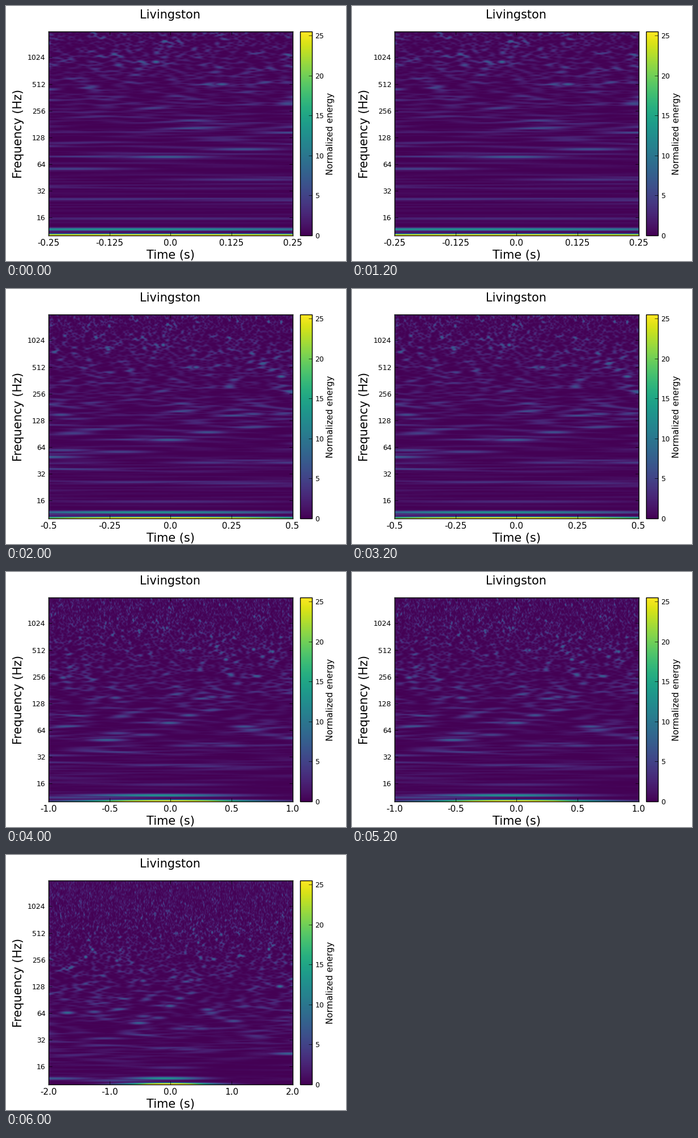
A matplotlib script for the animation above (8000 ms loop, 600x450 px).

```python
import numpy as np
import matplotlib.pyplot as plt
from matplotlib.animation import FuncAnimation

plt.rcParams.update({
    "font.family": "DejaVu Sans",
    "axes.linewidth": 1.0,
    "xtick.direction": "in", "ytick.direction": "in",
    "xtick.top": True, "ytick.right": True,
    "xtick.major.size": 4, "ytick.major.size": 4,
    "xtick.major.width": 0.5, "ytick.major.width": 0.5,
    "xtick.major.pad": 4, "ytick.major.pad": 4,
})

W, H, DPI = 600, 450, 100
F_MIN, F_MAX, ROWS = 10, 2000, 360
SPAN, RATE, Q = 8, 1024, 55      # seconds of noise, samples per second, quality
CYCLES = 5                       # burst length in periods of its own frequency
E_MAX = 25.5
HALF_WIDTHS = (0.25, 0.5, 1.0, 2.0)

# time (s), frequency (Hz), peak energy
BURSTS = [
    (-0.03, 10.05, 32), (-0.10, 11.75, 13.5), (-1.95, 11.7, 7), (-0.85, 11.1, 5),
    (0, 15.5, 3.2), (0.28, 25, 3.6), (0.15, 42.7, 4), (0.5, 42.7, 4.5),
    (-0.01, 77, 7.5), (0.15, 94, 6.5), (-0.21, 56.5, 5), (-0.03, 908, 9),
    (0.105, 508, 7.5), (-0.52, 49.4, 8), (0.453, 400, 8.5), (-0.45, 148, 6),
    (0.337, 151, 5.5), (-0.44, 59, 5), (-0.255, 810, 8), (0.605, 70, 6.5),
    (-0.88, 250, 7), (0.835, 490, 9), (0.68, 520, 9), (-1.69, 64.5, 9),
    (-1.25, 66, 6), (1.79, 128, 10), (1.96, 22.3, 8), (1.61, 336, 11),
    (-1.28, 333, 10), (-1.39, 275, 10), (1.03, 52, 6),
]

octave_lo, octave_hi = np.log2([F_MIN, F_MAX])
octave_step = (octave_hi - octave_lo) / ROWS
octaves = octave_lo + (np.arange(ROWS) + 0.5) * octave_step


def q_transform_noise(seed=11):
    """Normalized energy of white noise seen through constant-Q windows."""
    rng = np.random.default_rng(seed)
    n_bins = int(F_MAX * 1.1 * SPAN)
    spectrum = rng.normal(size=n_bins) + 1j * rng.normal(size=n_bins)
    energy = np.empty((ROWS, SPAN * RATE))
    for row, freq in enumerate(2 ** octaves):
        half = freq * np.sqrt(11) / Q
        bins = np.arange(int((freq - half) * SPAN) + 1, int((freq + half) * SPAN) + 1)
        window = (1 - ((bins / SPAN - freq) / half) ** 2) ** 2
        band = np.fft.ifft(spectrum[bins] * window, SPAN * RATE)
        power = np.abs(band) ** 2
        energy[row] = power / power.mean()
    start = SPAN * RATE // 2 - 2 * RATE
    return energy[:, start:start + 4 * RATE]


def make_energy():
    times = -2 + (np.arange(4 * RATE) + 0.5) / RATE
    level = np.interp(octaves, np.log2([10, 14, 18, 200]), [0.15, 0.3, 0.7, 1])
    energy = np.minimum(q_transform_noise(), 7) * level[:, None]
    for t, freq, peak in BURSTS:
        pulse = np.exp(-0.5 * ((times - t) * freq / CYCLES) ** 2)
        line = np.exp(-0.5 * ((octaves - np.log2(freq)) / (1.8 * octave_step)) ** 2)
        energy = np.maximum(energy, peak * np.outer(line, pulse))
    return energy


def pixel_axes(left, top, right, bottom):
    return fig.add_axes([left / W, 1 - bottom / H, (right - left) / W, (bottom - top) / H])


def label(x, y, text, size, **kw):
    fig.text(x / W, 1 - y / H, text, size=size, ha="center", va="baseline",
             rotation_mode="anchor", **kw)


fig = plt.figure(figsize=(W / DPI, H / DPI), dpi=DPI, facecolor="white")
ax = pixel_axes(75, 45, 505.5, 405)
image = ax.imshow(make_energy(), origin="lower", aspect="auto", cmap="viridis",
                  vmin=0, vmax=E_MAX, interpolation="bilinear",
                  extent=(-2, 2, octave_lo, octave_hi))
ax.set_yticks(range(4, 11), [str(2 ** k) for k in range(4, 11)])
ax.tick_params(axis="x", labelsize=11)
ax.tick_params(axis="y", labelsize=9)

bar_ax = pixel_axes(518.5, 45, 540, 405)
fig.colorbar(image, cax=bar_ax, ticks=range(0, 26, 5))
bar_ax.tick_params(labelsize=9, left=False)

label(290, 22, "Livingston", 15)
label(290, 446, "Time (s)", 15)
label(28, 225, "Frequency (Hz)", 15, rotation=90)
label(577, 225, "Normalized energy", 11, rotation=90)


def update(index):
    half = HALF_WIDTHS[index]
    ticks = [half * k / 2 for k in range(-2, 3)]
    ax.set_xticks(ticks, [str(t) for t in ticks])
    ax.set_xlim(-half, half)
    return [image]


anim = FuncAnimation(fig, update, frames=len(HALF_WIDTHS), interval=2000,
                     repeat=True, repeat_delay=0, blit=False)
plt.show()
```
